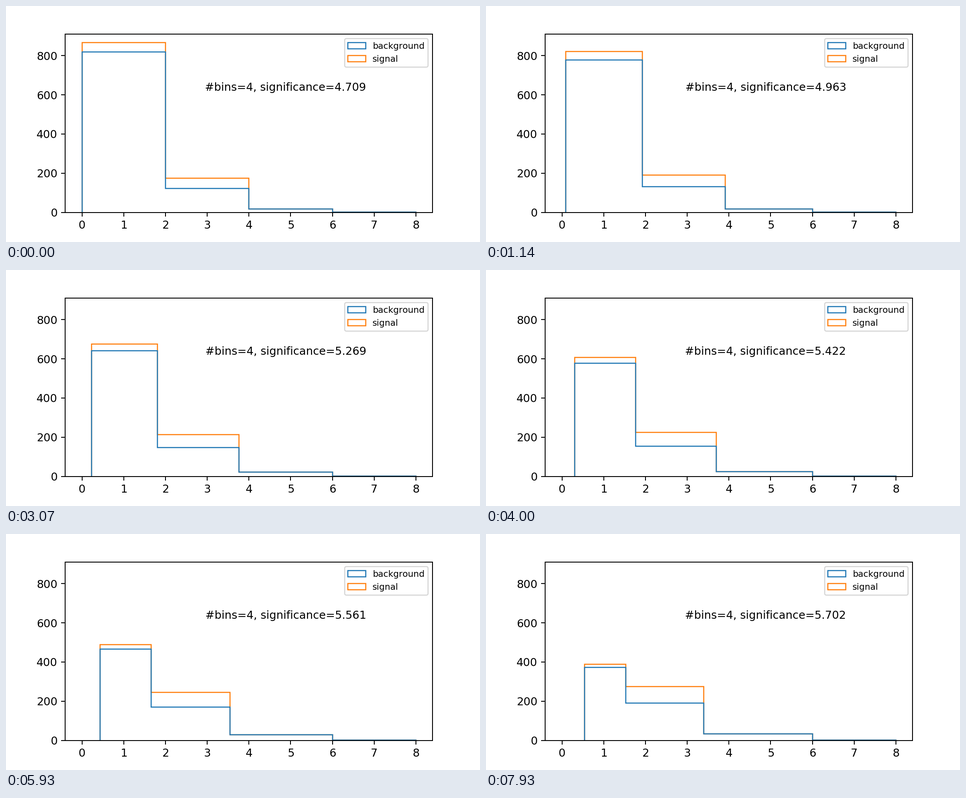
Recreate the animation shown at these times as a matplotlib script. Size 1058x529 px, loop 8 s.

```python
from math import erfc, exp, sqrt

import numpy as np
import matplotlib.pyplot as plt
from matplotlib.animation import FuncAnimation
from matplotlib.patches import Polygon

STEPS = 112
TICKS_PER_STEP = 2
LOOP_MS = 8000

plt.rcParams["font.family"] = "DejaVu Sans"
plt.rcParams["text.kerning_factor"] = 6  # whole-pixel kerning

# Path of the three moving bin edges; the last two edges stay put.
KEY_STEPS = [0, 31, 72, 111]
KEY_EDGES = [
    [0.010, 0.165, 0.390, 0.542],
    [2.000, 1.857, 1.703, 1.532],
    [4.000, 3.829, 3.612, 3.398],
]
FIXED_EDGES = [6, 8]


def edges_at(step):
    return [np.interp(step, KEY_STEPS, path) for path in KEY_EDGES] + FIXED_EDGES


def background_above(x):
    """Exponential decay with a short turn-on near zero."""
    return 1020 * exp(-x / 1.02) - 72 * exp(-x / 0.025)


def signal_above(x):
    """Upper tail of a normal peak of 100 events."""
    return 50 * erfc((x - 2.03) / (0.52 * sqrt(2)))


def counts(above, edges):
    return np.round(-np.diff([above(x) for x in edges]))


def significance(s, b):
    """Asimov significance, summed in quadrature over the bins."""
    return sqrt(np.sum(2 * ((s + b) * np.log1p(s / b) - s)))


def outline(edges, heights):
    x = np.repeat(edges, 2)
    y = np.concatenate([[0], np.repeat(heights, 2), [0]])
    return np.column_stack([x, y])


fig, ax = plt.subplots(figsize=(6, 3), dpi=1058 / 6)
fig.subplots_adjust(left=0.125, right=0.9, bottom=0.125, top=0.88)
ax.set_xlim(-0.4, 8.4)
ax.set_ylim(0, 865 * 1.05)
ax.set_xticks(range(9))
ax.set_yticks(range(0, 801, 200))


def add_steps(color, label, zorder):
    patch = Polygon([[0, 0], [1, 0]], closed=False, fill=False,
                    edgecolor=color, linewidth=1, label=label, zorder=zorder)
    return ax.add_patch(patch)


background_steps = add_steps("tab:blue", "background", 1.1)
total_steps = add_steps("tab:orange", "signal", 1)
ax.legend(handles=[background_steps, total_steps], loc="upper right", fontsize=8)
caption = ax.text(0.6, 0.7, "", transform=ax.transAxes, fontsize=10,
                  ha="center", va="center")


def update(tick):
    # Round up, so that a step never appears late.
    step = min(-(-tick // TICKS_PER_STEP), STEPS - 1)
    edges = edges_at(step)
    background = counts(background_above, edges)
    signal = counts(signal_above, edges)
    background_steps.set_xy(outline(edges, background))
    total_steps.set_xy(outline(edges, background + signal))
    value = significance(signal, background)
    caption.set_text(f"#bins={len(background)}, significance={value:.3f}")
    return background_steps, total_steps, caption


ticks = STEPS * TICKS_PER_STEP
anim = FuncAnimation(fig, update, frames=ticks, interval=LOOP_MS / ticks,
                     repeat=True, repeat_delay=0)
plt.show()
```
